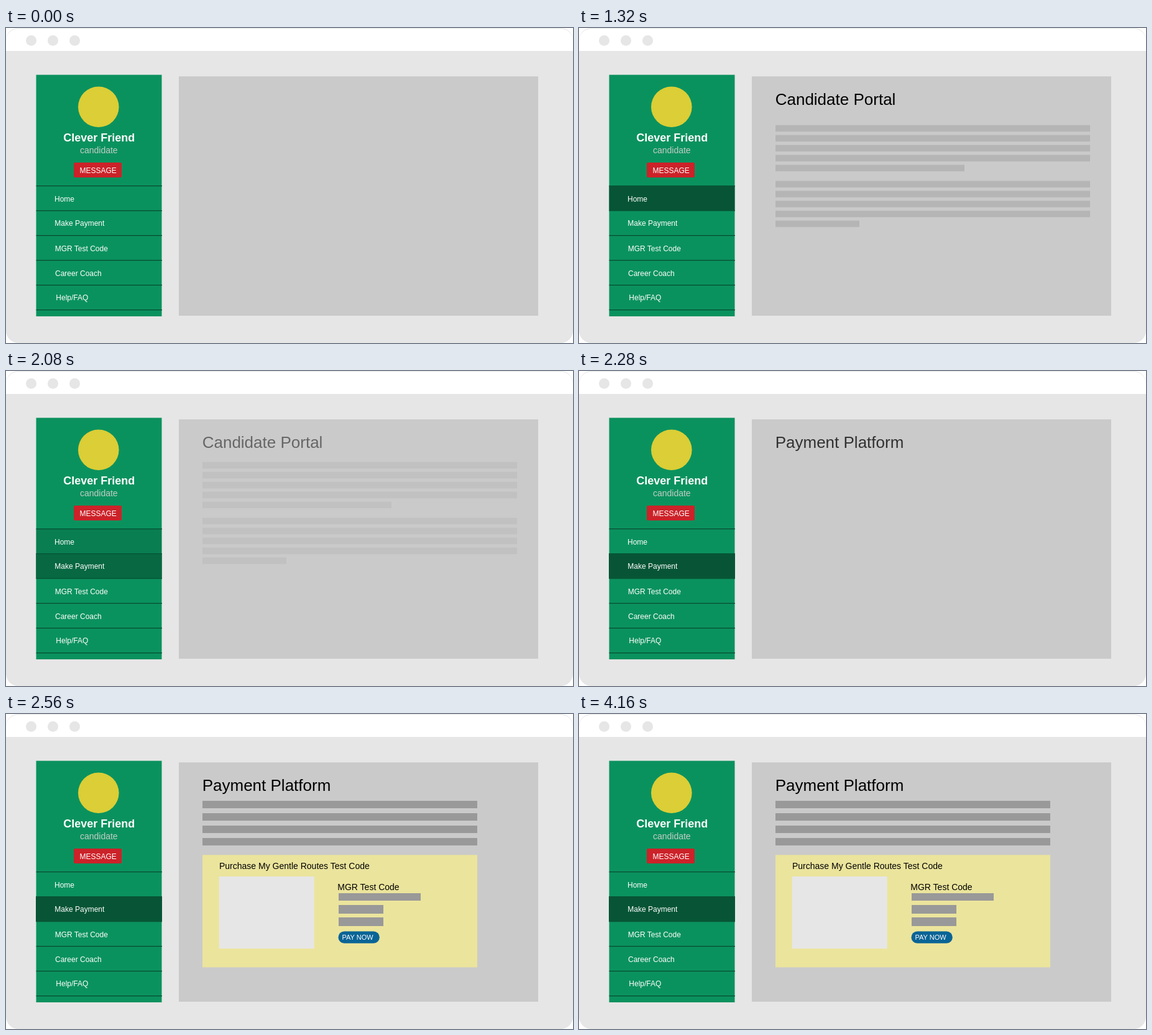
An HTML page for the animation above (6000 ms loop, 912 px wide and 508 px high).

```html
<!DOCTYPE html>
<html lang="en">
<head>
<meta charset="utf-8">
<title>Payment walkthrough</title>
<style>
html, body { margin: 0; width: 100%; height: 100%; overflow: hidden; background: #fff; }
svg { display: block; width: 912px; height: 508px; font-family: "Liberation Sans", Arial, sans-serif; }
.menu { fill: #fff; font-size: 12px; }
.title { font-size: 26px; }
.label { font-size: 14px; }
.bars { fill: #999; }
.active { fill: #075536; }

/* one loop = 6000 ms */
.anim { animation: 6s linear infinite; }
.home-item { animation-name: home-item; }
.pay-item { animation-name: pay-item; }
.home-title { animation-name: home-title; }
.home-text { animation-name: home-fade, home-rise; }
.pay-title { animation-name: pay-title; }
.pay-page { animation-name: pay-fade, pay-rise; }
.picture { animation-name: picture; }
.button { animation-name: press; }

@keyframes home-item {
  0%, .167% { opacity: 0; }
  2.5%, 33.333% { opacity: 1; }
  35.333%, 100% { opacity: 0; }
}
@keyframes pay-item {
  0%, 33.333% { opacity: 0; }
  35.333%, 100% { opacity: 1; }
}
@keyframes home-title {
  0%, 5.333% { opacity: 0; }
  10.667%, 33.333% { opacity: 1; }
  36%, 100% { opacity: 0; }
}
@keyframes home-fade {
  0%, 21.333% { opacity: 0; }
  23%, 33.333% { opacity: 1; }
  35%, 100% { opacity: 0; }
}
@keyframes home-rise {
  0% { transform: translateY(17.8px); }
  21.333% { transform: translateY(17.8px); animation-timing-function: cubic-bezier(.333, .667, .667, 1); }
  24%, 100% { transform: none; }
}
@keyframes pay-title {
  0%, 36% { opacity: 0; }
  38.667%, 100% { opacity: 1; }
}
@keyframes pay-fade {
  0%, 38.667% { opacity: 0; }
  40.917%, 100% { opacity: 1; }
}
@keyframes pay-rise {
  0% { transform: translateY(164px); }
  38.667% { transform: translateY(164px); animation-timing-function: cubic-bezier(.333, .667, .667, 1); }
  42.667%, 100% { transform: none; }
}
@keyframes picture {
  0%, 40% { fill: #dcf6ff; }
  42.667%, 100% { fill: #e6e6e6; }
}
@keyframes press {
  0%, 66.667% { opacity: 1; }
  68% { opacity: .5; }
  69.333%, 100% { opacity: 1; }
}
</style>
</head>
<body>
<svg viewBox="0 0 912 508">
  <!-- browser window -->
  <rect width="912" height="508" rx="20" fill="#e6e6e6"/>
  <path d="M0 37V21A20 20 0 0 1 20 1H892A20 20 0 0 1 912 21V37Z" fill="#fff"/>
  <g fill="#e6e6e6">
    <circle cx="40.5" cy="20.3" r="8.5"/>
    <circle cx="75.5" cy="20.3" r="8.5"/>
    <circle cx="110.5" cy="20.3" r="8.5"/>
  </g>

  <!-- sidebar -->
  <rect x="48.5" y="75.5" width="202" height="389.5" fill="#0a925e"/>
  <circle cx="148.8" cy="127.3" r="32.8" fill="#dbce36"/>
  <text x="149.7" y="183" text-anchor="middle" font-size="18" font-weight="700" fill="#fff">Clever Friend</text>
  <text x="149.3" y="201.5" text-anchor="middle" font-size="14" fill="#c4cdc7">candidate</text>
  <rect x="109" y="217" width="77" height="24" rx="2" fill="#cc2229"/>
  <text class="menu" x="118.5" y="233.8">MESSAGE</text>
  <path d="M48.5 254.6H251M48.5 294.6H251M48.5 334.6H251M48.5 374.6H251M48.5 414.6H251M48.5 454.6H251" stroke="#084a30" stroke-width="1.4"/>
  <rect class="active anim home-item" x="48.5" y="254" width="202" height="41"/>
  <rect class="active anim pay-item" x="48" y="294" width="203" height="41"/>
  <g class="menu">
    <text x="78" y="280">Home</text>
    <text x="78.3" y="318.6">Make Payment</text>
    <text x="78.7" y="360">MGR Test Code</text>
    <text x="79" y="400">Career Coach</text>
    <text x="80.3" y="438.7">Help/FAQ</text>
  </g>

  <!-- content -->
  <rect x="278" y="78" width="578" height="386" fill="#cacaca"/>
  <text class="title anim home-title" x="315.7" y="123.8">Candidate Portal</text>
  <g class="bars anim home-text">
    <path id="lines" d="M316 146.8h506v10.4h-506zm0 16h506v10.4h-506zm0 16h506v10.4h-506zm0 16h506v10.4h-506z"/>
    <use href="#lines" y="90"/>
    <rect x="316" y="210.8" width="304" height="10.4"/>
    <rect x="316" y="300.8" width="135" height="10.4"/>
  </g>

  <text class="title anim pay-title" x="315.7" y="123.8">Payment Platform</text>
  <g class="anim pay-page">
    <path class="bars" d="M316 140h442v12h-442zm0 20h442v12h-442zm0 20h442v12h-442zm0 20h442v12h-442z"/>
    <rect x="316" y="227.3" width="442" height="181.2" fill="#ebe49c"/>
    <text class="label" x="343" y="250">Purchase My Gentle Routes Test Code</text>
    <rect class="anim picture" x="342.7" y="262" width="153" height="116.3"/>
    <text class="label" x="533.3" y="284">MGR Test Code</text>
    <path class="bars" d="M535 289h132v12h-132zm0 19h72v14h-72zm0 20h72v14h-72z"/>
    <g class="anim button">
      <rect x="534.5" y="350.5" width="66.3" height="19.3" rx="9.65" fill="#0a6496"/>
      <text x="540.5" y="364" font-size="11" fill="#fff">PAY NOW</text>
    </g>
  </g>
</svg>
</body>
</html>
```
